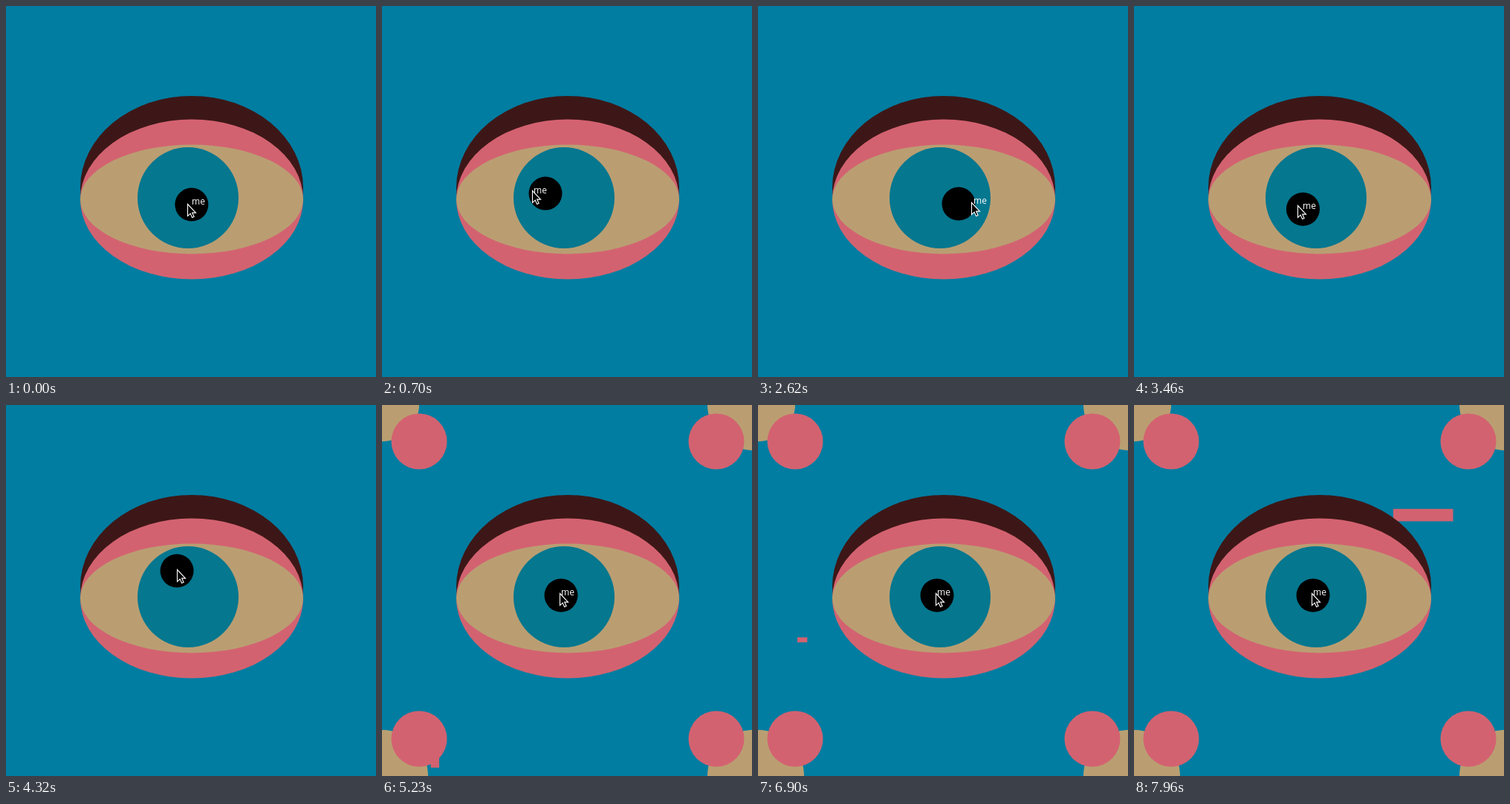
These frames come from a looping animation (498 by 499 pixels, 8000 ms). An HTML page with a canvas:

```html
<!DOCTYPE html>
<html lang="en">
<head>
<meta charset="utf-8">
<title>Watching eye</title>
<style>
  html, body { margin: 0; width: 100%; height: 100%; overflow: hidden; background: #007da1; }
  canvas { display: block; }
</style>
</head>
<body>
<canvas id="stage" width="498" height="499"></canvas>
<script>
const ctx = document.getElementById('stage').getContext('2d');
const LOOP = 8000, PRESSED_AT = 4890, BAR_STEP = 30;
const BLUE = '#007da1', BROWN = '#3d1717', PINK = '#d36270', TAN = '#ba9e72', IRIS = '#05778f';

// Turning points of the mouse as it circles the eye: time, x, y
const path = [
  [0, 250, 267], [150, 231, 276], [820, 203, 246], [1360, 233, 215], [2000, 282, 219],
  [2620, 290, 266], [3290, 251, 280], [3800, 184, 250], [4320, 230, 223], [4620, 241, 256]
];

const clamp = (v, lo, hi) => Math.min(hi, Math.max(lo, v));

function random(seed) {
  const s = Math.sin(seed * 127.1 + 3.7) * 43758.5453;
  return s - Math.floor(s);
}

// Velocity at a turning point, from its neighbours; the mouse stops at the last one
function slope(i, axis) {
  const last = path.length - 1;
  if (i === last) return 0;
  const a = path[Math.max(i - 1, 0)], b = path[i + 1];
  return (b[axis] - a[axis]) / (b[0] - a[0]);
}

// Cubic Hermite curve through the turning points
function mouseAt(t) {
  t = clamp(t, 0, path[path.length - 1][0]);
  const next = Math.max(1, path.findIndex(p => p[0] >= t));
  const a = path[next - 1], b = path[next];
  const span = b[0] - a[0], u = (t - a[0]) / span;
  return [1, 2].map(axis => {
    const va = slope(next - 1, axis) * span, vb = slope(next, axis) * span;
    const d = b[axis] - a[axis];
    return a[axis] + u * (va + u * (3 * d - 2 * va - vb + u * (va + vb - 2 * d)));
  });
}

function ellipse(color, x, y, rx, ry = rx) {
  ctx.fillStyle = color;
  ctx.beginPath();
  ctx.ellipse(x, y, rx, ry, 0, 0, Math.PI * 2);
  ctx.fill();
}

function drawCorners() {
  for (const x of [0, 500])
    for (const y of [-1, 499]) ellipse(TAN, x, y, x === 0 && y < 0 ? 50 : 62);
  for (const x of [50, 450])
    for (const y of [49, 449]) ellipse(PINK, x, y, 37.5);
}

// A new bar of random place and size on every step; some fall behind the eye or off stage
function drawBar(t) {
  const seed = Math.floor((t - PRESSED_AT) / BAR_STEP) * 4;
  const between = (k, lo, hi) => lo + random(seed + k) * (hi - lo);
  ctx.fillStyle = PINK;
  ctx.fillRect(between(1, 0, 600), between(2, 0, 560), between(3, 10, 100), between(4, 5, 20));
}

function drawEye() {
  ellipse(BROWN, 250, 244, 150, 123);
  ellipse(PINK, 250, 260, 150, 107.5);
  ellipse(TAN, 250, 260, 150, 73.5);
  ellipse(IRIS, 245, 258, 68);
}

const arrow = new Path2D('M0 0V16L3.7 12.6L6.1 18L8.6 16.9L6.2 11.6H11Z');

function drawCursor(x, y) {
  ctx.save();
  ctx.translate(x, y);
  ctx.fillStyle = '#000';
  ctx.strokeStyle = '#fff';
  ctx.lineWidth = 1.1;
  ctx.fill(arrow);
  ctx.stroke(arrow);
  ctx.restore();
}

function draw(t) {
  ctx.fillStyle = BLUE;
  ctx.fillRect(0, 0, 498, 499);
  if (t >= PRESSED_AT) {
    drawBar(t);
    drawCorners();
  }
  drawEye();

  const [x, y] = mouseAt(t);
  ellipse('#000', clamp(x, 220, 270), clamp(y, 219, 281), 22.5);
  if (y > 240) {
    ctx.fillStyle = '#fff';
    ctx.font = '12px "Open Sans", sans-serif';
    ctx.fillText('me', Math.round(x), Math.round(y));
  }
  // The pointer runs slightly ahead of the pupil
  const [px, py] = mouseAt(t + 30);
  drawCursor(Math.round(px) - 1.5, Math.round(py) - 2.5);
}

const startTime = performance.now();
function tick() {
  draw((performance.now() - startTime) % LOOP);
  requestAnimationFrame(tick);
}
tick();
</script>
</body>
</html>
```
